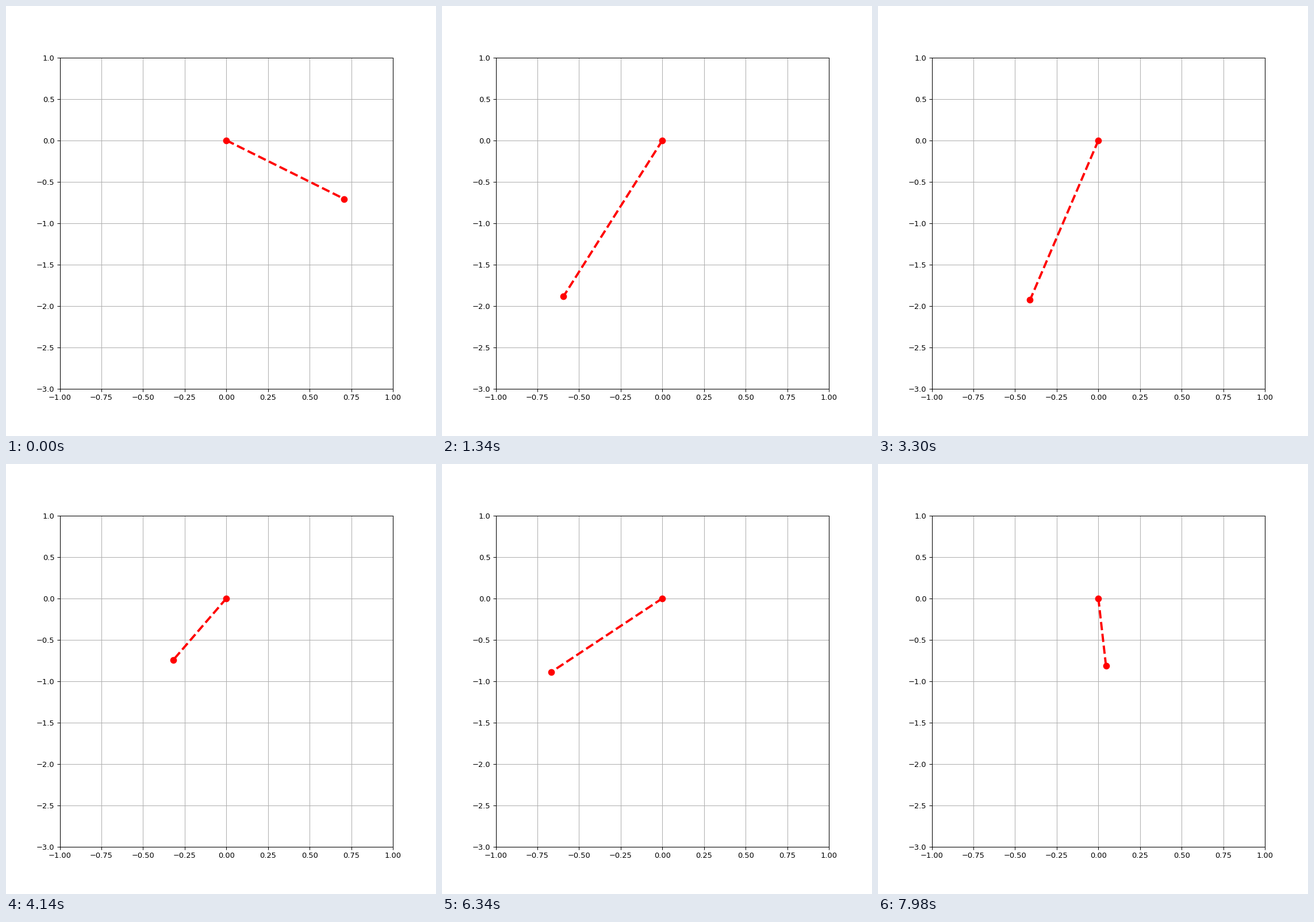
These frames come from a looping animation (748x748 px, 8 s). A matplotlib script:

```python
import numpy as np
import matplotlib.pyplot as plt
from matplotlib.animation import FuncAnimation

# Elastic pendulum: unit mass on a spring, released from rest
G = 9.81
K = 10.0
REST = 0.5
FRAMES = 400
STEP = 20 / 999
SUBSTEPS = 8


def slope(state):
    pos, vel = state
    stretch = 1 - REST / np.hypot(*pos)
    return np.array([vel, -K * stretch * pos - [0, G]])


def rk4(state, h):
    k1 = slope(state)
    k2 = slope(state + h / 2 * k1)
    k3 = slope(state + h / 2 * k2)
    k4 = slope(state + h * k3)
    return state + h / 6 * (k1 + 2 * k2 + 2 * k3 + k4)


def swing():
    angle = np.pi / 4
    state = np.array([[np.sin(angle), -np.cos(angle)], [0.0, 0.0]])
    path = [state[0]]
    for _ in range(FRAMES - 1):
        for _ in range(SUBSTEPS):
            state = rk4(state, STEP / SUBSTEPS)
        path.append(state[0])
    return np.array(path)


path = swing()

fig, ax = plt.subplots(figsize=(8, 8), dpi=93.5)
ax.set_xlim(-1, 1)
ax.set_ylim(-3, 1)
ax.set_xticks(np.arange(-1, 1.01, 0.25))
ax.set_yticks(np.arange(-3, 1.01, 0.5))
ax.grid()
rod, = ax.plot([], [], "ro--", lw=3, markersize=8)


def update(i):
    x, y = path[i]
    rod.set_data([0, x], [0, y])
    return rod,


anim = FuncAnimation(fig, update, frames=FRAMES, interval=20,
                     repeat=True, repeat_delay=0, blit=True)
plt.show()
```
